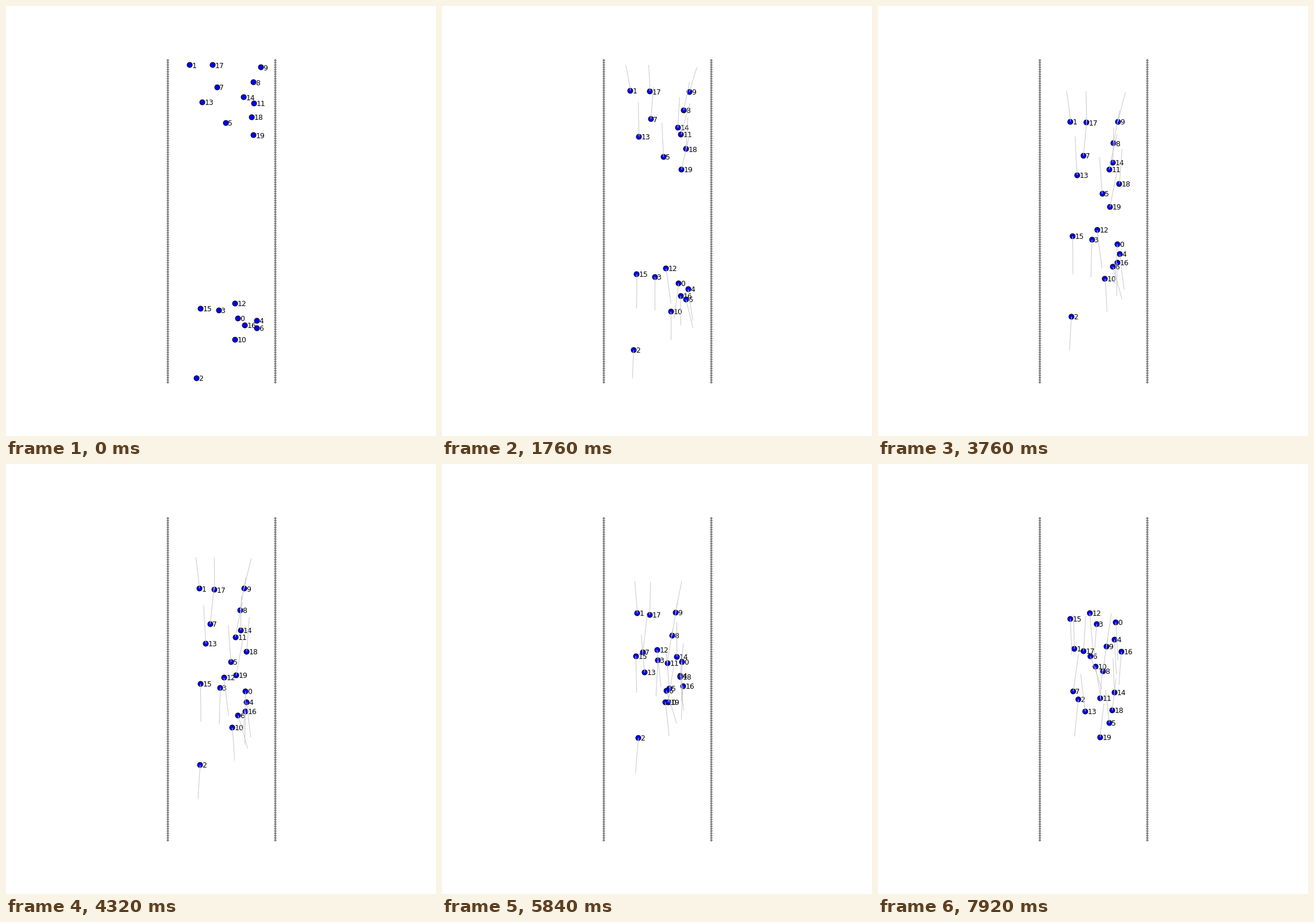
Animation of 748 by 748 pixels, one loop 8000 ms. Source, as a matplotlib script:

```python
import numpy as np
import matplotlib.pyplot as plt
from matplotlib.animation import FuncAnimation
from matplotlib.collections import LineCollection

SIZE, DPI = 748, 100
PX = 72 / DPI  # one pixel in points
FRAMES, INTERVAL = 100, 80
TRAIL = 25  # steps of history behind each walker

# Start x, start y, end x, end y and sideways bow of each walker.
WALKERS = np.array([
    (403, 543, 413, 275, 8),
    (319, 102, 341, 321, 5),
    (331, 647, 348, 409, -3),
    (370, 529, 380, 278, -3),
    (436, 547, 411, 305, -4),
    (382, 203, 402, 450, -2),
    (436, 560, 369, 334, 4),
    (367, 141, 339, 395, 3),
    (430, 132, 391, 360, -2),
    (443, 106, 397, 317, -4),
    (398, 580, 378, 352, 6),
    (431, 169, 386, 407, -8),
    (398, 517, 368, 259, -3),
    (341, 167, 360, 430, -4),
    (413, 158, 411, 397, -4),
    (338, 526, 334, 269, 2),
    (415, 555, 423, 326, -3),
    (359, 102, 357, 325, 4),
    (427, 193, 407, 428, 2),
    (430, 224, 386, 475, -6),
])


def walk(u):
    """Paths of all walkers; those at the rear of a group set off slower."""
    x0, y0, x1, y1, bow = WALKERS.T[:, :, None]
    down = y1 > y0
    lead = np.where(down, y0 - y0[down].mean(), y0[~down].mean() - y0)
    arch = u * (1 - u)
    progress = u + 0.002 * np.clip(lead, -50, 50) * arch
    x = x0 + (x1 - x0) * u + 4 * bow * arch
    y = y0 + (y1 - y0) * progress
    return np.stack([x, y], axis=-1)


paths = walk(np.linspace(0, 1, FRAMES))

plt.rcParams["path.simplify"] = False
fig = plt.figure(figsize=(SIZE / DPI, SIZE / DPI), dpi=DPI, facecolor="white")
ax = fig.add_axes([0, 0, 1, 1])
ax.set_xlim(-0.5, SIZE - 0.5)
ax.set_ylim(SIZE - 0.5, -0.5)
ax.axis("off")

bead_y = np.arange(94, 656, 4)
for wall_x in (281, 468):
    ax.scatter(np.full_like(bead_y, wall_x), bead_y, s=(3.54 * PX) ** 2, marker="D",
               color="#808080", linewidths=0, antialiased=False)

labels = [ax.text(0, 0, str(n), family="DejaVu Sans", size=12.4 * PX, zorder=2)
          for n in range(len(paths))]
dots = ax.scatter(*paths[:, 0].T, s=(9 * PX) ** 2, facecolor="#0000ff",
                  edgecolor="black", linewidths=PX, zorder=3)
trails = ax.add_collection(
    LineCollection([], colors="#c8c8c8", linewidths=PX, zorder=4), autolim=False)


def draw(step):
    now = np.round(paths[:, step])
    dots.set_offsets(now)
    for label, (x, y) in zip(labels, now):
        label.set_position((x + 4, y + 5))
    trails.set_segments(list(paths[:, max(0, step - TRAIL):step + 1]) if step else [])
    return *labels, dots, trails


anim = FuncAnimation(fig, draw, frames=FRAMES, interval=INTERVAL, repeat=True, repeat_delay=0)
plt.show()
```
